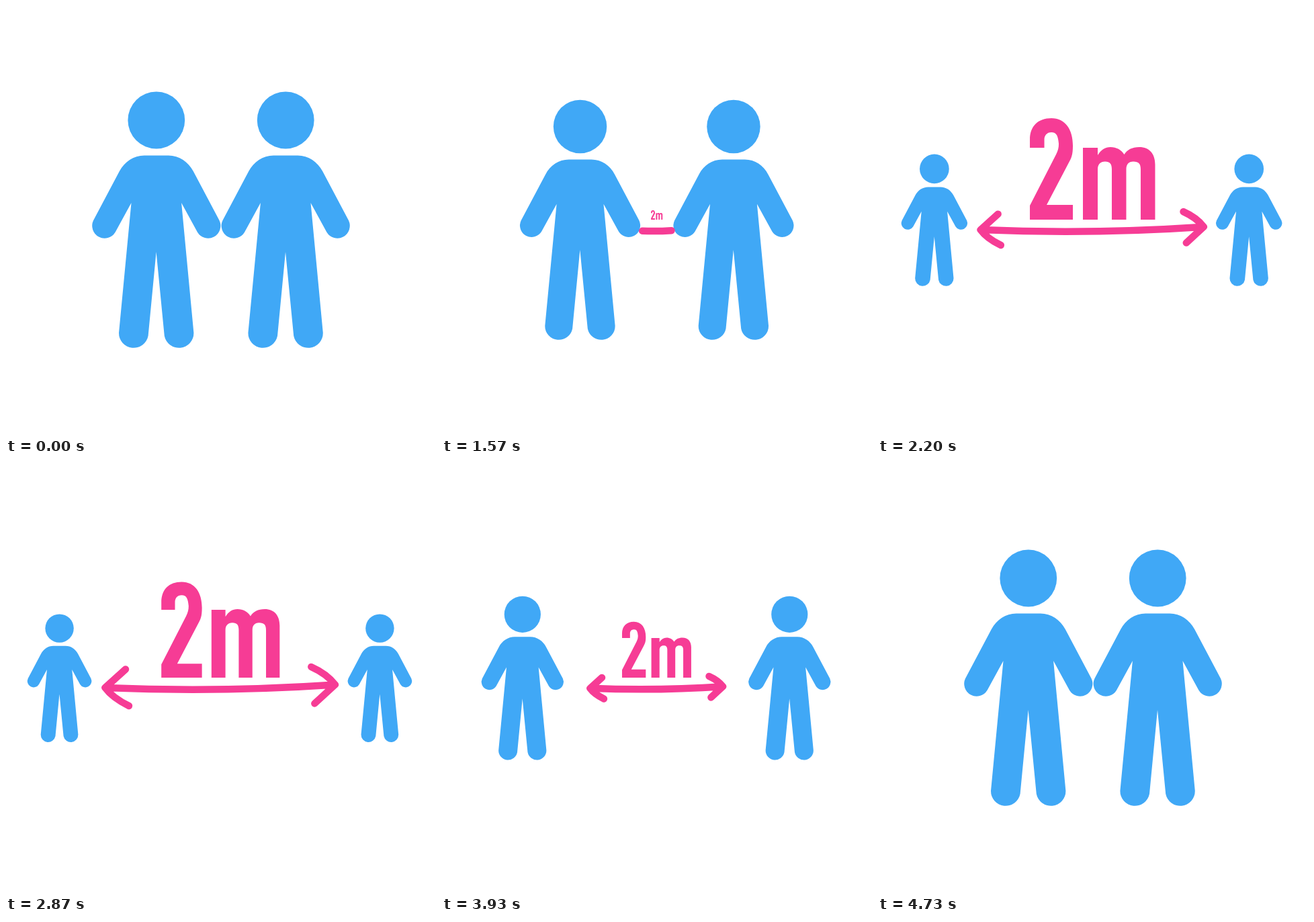
Recreate the animation shown at these times as an HTML page with a canvas. Size 640 px wide and 640 px high, loop 4830 ms.

```html
<!DOCTYPE html>
<html lang="en">
<head>
<meta charset="utf-8">
<title>Keep your distance</title>
<style>
  html, body { margin: 0; width: 100%; height: 100%; overflow: hidden; background: #fff; }
  canvas { display: block; width: 100vmin; height: 100vmin; }
</style>
</head>
<body>
<canvas id="stage" width="640" height="640" role="img" aria-label="Two people moving 2m apart"></canvas>
<script>
const ctx = document.getElementById('stage').getContext('2d');
const LOOP = 4830;
const BLUE = '#40a8f6';
const PINK = '#f63c95';

// Figure, with x measured from its own centre line.
const body = new Path2D(
  'M-18 222.5 H18 C34 222.5 47.5 232 55 246 L93.8 319.3 A18.5 18.5 0 0 1 61.2 336.7' +
  'L37.3 293 L55.6 486.5 A22 22 0 0 1 12 491 L-.2 366 L-12.2 491 A22 22 0 0 1 -55.8 486.5' +
  'L-37.3 293 L-61.2 336.7 A18.5 18.5 0 0 1 -93.8 319.3 L-55 246 C-47.5 232 -34 222.5 -18 222.5 Z');
const head = new Path2D();
head.arc(0, 170, 42.4, 0, Math.PI * 2);

// Condensed "2m", 151 units tall on a baseline at y = 318.
const label = new Path2D(
  'M226 211 V199 C226 179 238 167 258 167 C279 167 290 184 290 208 C290 222 288 226 283 235' +
  'L251 296 H290 V318 H226 V297 L265 221 C268 215 269 211 269 205 C268 194 266 188 258 188' +
  'C251 188 247.5 193 247.5 199 V211 Z' +
  'M305 211 H327 V222 C332 214 338 210 346 210 C355 210 362 214 366.5 221' +
  'C371 214 378 210 389 210 C404 210 412.5 220 412.5 236 V318 H391 V243' +
  'C391 235 388 231.5 380 231.5 C373 231.5 369.5 236 369.5 243 V318 H348 V243' +
  'C348 235 345 231.5 338 231.5 C331 231.5 327 236 327 243 V318 H305 Z');
const LABEL_HEIGHT = 144.3;

const clamp = x => Math.min(1, Math.max(0, x));
const progress = (t, start, end) => clamp((t - start) / (end - start));
const easeInOut = x => x < 0.5 ? 4 * x ** 3 : 1 - 4 * (1 - x) ** 3;
const eased = (t, start, end) => easeInOut(progress(t, start, end));

// Linear growth followed by a decaying bounce.
function springIn(t) {
  const start = 1517, landing = 2078;
  if (t < landing) return progress(t, start, landing);
  const s = (t - landing) / 1000;
  return 1 + 0.118 * Math.exp(-2.6 * s) * Math.sin(2 * Math.PI * s / 0.3);
}

function drawPerson(x, scale) {
  ctx.save();
  ctx.translate(x, 319.2);
  ctx.scale(scale, scale);
  ctx.translate(0, -319.2);
  ctx.fillStyle = BLUE;
  ctx.fill(head);
  ctx.fill(body);
  ctx.restore();
}

function drawArrow(spread, headSize) {
  const left = { x: -172.5 * spread, y: -2 * spread };
  const right = { x: 169.8 * spread, y: -6.5 * spread };
  const at = (tip, dx, dy) => [tip.x + dx * headSize, tip.y + dy * headSize];
  ctx.save();
  ctx.translate(320, 335);
  ctx.strokeStyle = PINK;
  ctx.lineWidth = 10.5;
  ctx.lineCap = ctx.lineJoin = 'round';
  ctx.beginPath();
  ctx.moveTo(left.x, left.y);
  ctx.quadraticCurveTo(0, 5 * spread, right.x, right.y);
  if (headSize > 0.01) {
    ctx.moveTo(...at(left, 30.5, -27.5));
    ctx.lineTo(left.x, left.y);
    ctx.quadraticCurveTo(...at(left, 11, 15), ...at(left, 35.5, 27));
    ctx.moveTo(...at(right, -35.5, -26.5));
    ctx.quadraticCurveTo(...at(right, -12, -16), right.x, right.y);
    ctx.lineTo(...at(right, -30.5, 28));
  }
  ctx.stroke();
  ctx.restore();
}

function drawLabel(scale) {
  const k = scale * LABEL_HEIGHT / 151;
  ctx.save();
  ctx.translate(319.7, 318);
  ctx.scale(k, k);
  ctx.translate(-319.7, -318);
  ctx.fillStyle = PINK;
  ctx.fill(label);
  ctx.restore();
}

function draw(t) {
  const apart = eased(t, 1163, 2453) - eased(t, 3400, 4690);
  const remaining = 1 - eased(t, 3400, 4523);

  ctx.fillStyle = '#fff';
  ctx.fillRect(0, 0, 640, 640);
  drawPerson(223.8 - 144.2 * apart, 1 - apart / 2);
  drawPerson(416.2 + 140.2 * apart, 1 - apart / 2);

  if (t < 1215 || remaining <= 0) return;
  drawArrow(eased(t, 1163, 2453) * remaining, eased(t, 1697, 2453) * remaining);
  const size = springIn(t) * remaining;
  if (size > 0) drawLabel(size);
}

const began = performance.now();
function tick() {
  draw((performance.now() - began) % LOOP);
  requestAnimationFrame(tick);
}
tick();
</script>
</body>
</html>
```
